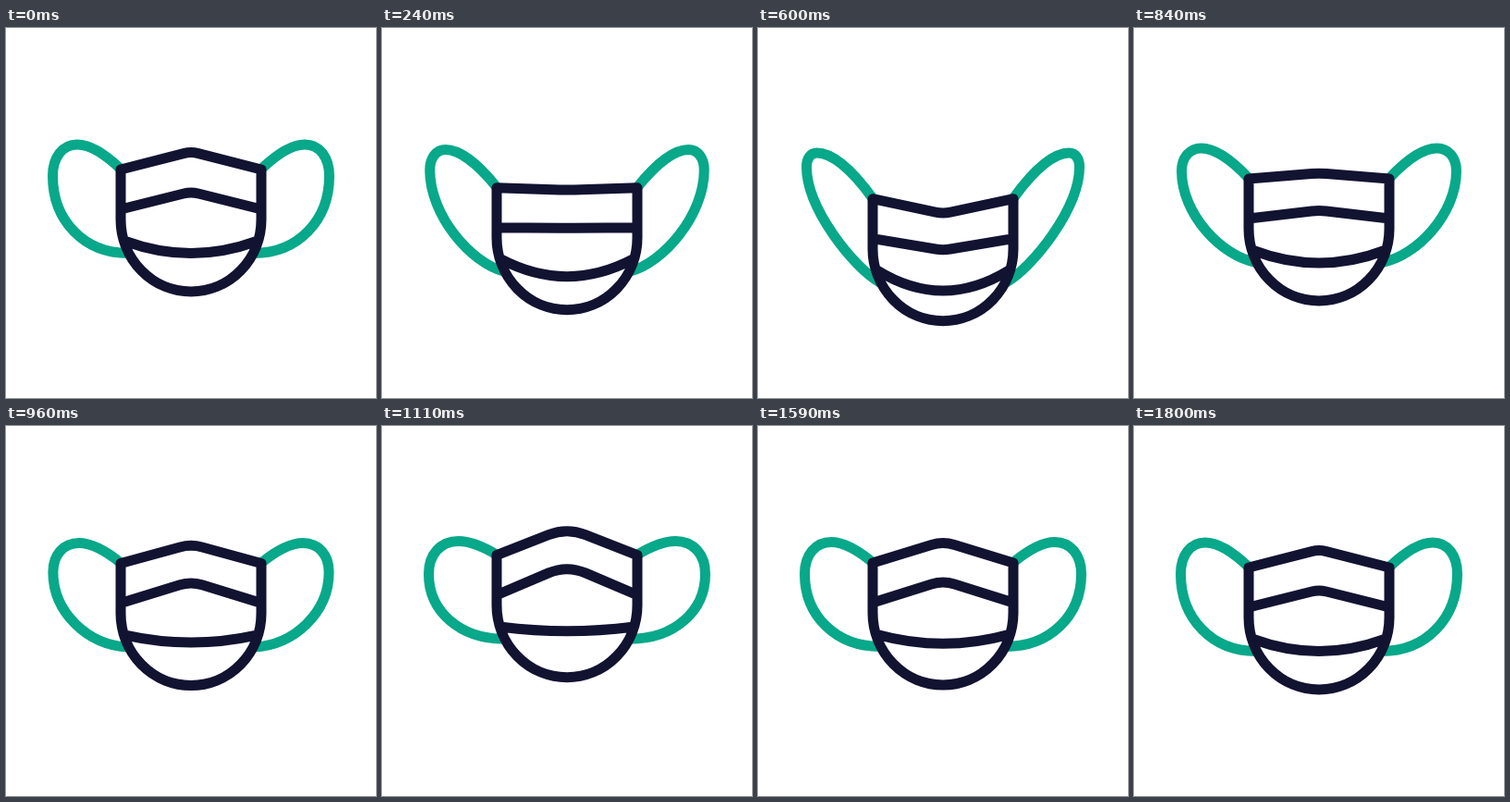
These frames come from a looping animation (400 px wide and 400 px high, 3330 ms). An HTML page:

```html
<!DOCTYPE html>
<html lang="en">
<head>
<meta charset="utf-8">
<title>Face mask</title>
<style>
  html, body { margin: 0; width: 100%; height: 100%; overflow: hidden; background: #fff; }
  svg { display: block; width: 100%; height: 100%; }
  path { fill: none; stroke-width: 11; stroke-linecap: round; stroke-linejoin: round; }
  .ear { stroke: #08a88a; stroke-linecap: butt; }
  .cloth { stroke: #121331; }
</style>
</head>
<body>
<svg viewBox="0 0 400 400">
  <path class="ear" id="leftEar"/>
  <path class="ear" id="rightEar" transform="matrix(-1 0 0 1 400 0)"/>
  <path class="cloth" id="cloth"/>
</svg>
<script>
const LOOP = 3330, STEP = 30;
const LEFT = 124, RIGHT = 276, MIDDLE = 200, RADIUS = 76;

// drop: how far the mask hangs below rest; strain: how tightly the ear loops are pulled
const rest = { drop: 0, strain: 0 };
const low = { drop: 32, strain: 1 };
const high = { drop: -13.3, strain: 0 };

const moves = [
  { start: 0, end: 570, from: rest, to: low, ease: u => Math.sin(u * Math.PI / 2) },
  { start: 570, end: 1120, from: low, to: high, ease: u => (1 - Math.cos(u * Math.PI)) / 2 },
  { start: 1120, end: 1800, from: high, to: rest, ease: u => u * u * (2 - u) }
];

const lerp = (a, b, k) => a + (b - a) * k;

function poseAt(time) {
  const { start, end, from, to, ease } = moves.find(m => time < m.end) || moves[2];
  const k = ease(Math.min(1, (time - start) / (end - start)));
  return { drop: lerp(from.drop, to.drop, k), strain: lerp(from.strain, to.strain, k) };
}

// A bent line across the mask with a rounded vertex in the middle
function crease(y, depth, round) {
  const shoulder = y + depth * (1 - round / RADIUS);
  return `M${LEFT} ${y}L${MIDDLE - round} ${shoulder}` +
    `Q${MIDDLE} ${y + depth} ${MIDDLE + round} ${shoulder}L${RIGHT} ${y}`;
}

function clothPath({ drop, strain }) {
  const side = 153 + drop;
  const round = 8 + Math.max(0, -drop) * 0.9;
  const hem = side + 77.5;
  const sag = 13 + 0.64 * drop - 11.5 * strain;
  return crease(side, -19.5 + 0.78 * drop + 11 * strain, round) +
    `V${side + 54}A${RADIUS} 78 0 0 1 ${LEFT} ${side + 54}Z` +
    crease(side + 43, drop - 19, round) +
    `M129 ${hem}Q${MIDDLE} ${hem + 2 * sag} 271 ${hem}`;
}

// Corner of the mask, over the top of the loop, round its outer edge, back to the chin
function earPath({ drop, strain }) {
  const cornerY = 152.5 + drop;
  const topX = 77 - 0.42 * drop, topY = 126 + 0.11 * drop + 5.5 * strain;
  const outerX = 50.5 + 2 * strain, outerY = 160 - 10 * strain;
  const chinX = 132, chinY = 243.5 + drop;
  const slack = 0.58 - 0.22 * strain;
  const pull = 0.6 * (0.58 - slack);
  return `M${LEFT} ${cornerY}` +
    `C${lerp(LEFT, topX, 0.4)} ${lerp(cornerY, topY, 0.68)} ${lerp(topX, LEFT, 0.25)} ${topY} ${topX} ${topY}` +
    `C${lerp(topX, outerX, 0.6)} ${topY} ${outerX} ${lerp(outerY, topY, 0.6)} ${outerX} ${outerY}` +
    `C${outerX} ${lerp(outerY, chinY, slack)} ${lerp(chinX, outerX, slack)} ${lerp(chinY, outerY, pull)} ${chinX} ${chinY}`;
}

const leftEar = document.getElementById('leftEar');
const rightEar = document.getElementById('rightEar');
const cloth = document.getElementById('cloth');

function draw(time) {
  const pose = poseAt(time);
  leftEar.setAttribute('d', earPath(pose));
  rightEar.setAttribute('d', earPath(pose));
  cloth.setAttribute('d', clothPath(pose));
}

const began = performance.now();

function tick() {
  const time = (performance.now() - began) % LOOP;
  draw(Math.floor(time / STEP) * STEP);
  requestAnimationFrame(tick);
}
tick();
</script>
</body>
</html>
```
